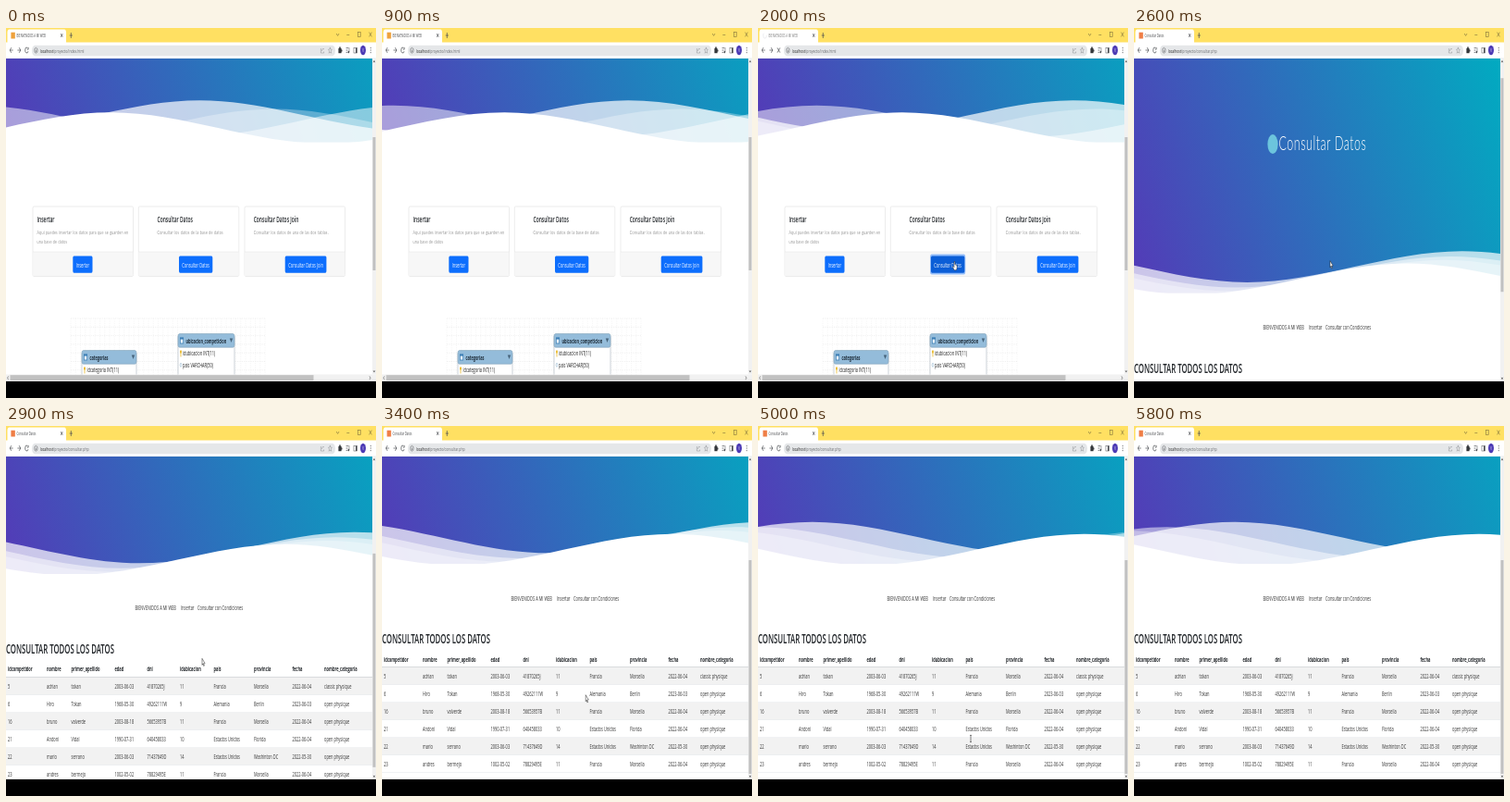
Write an HTML page with a canvas that moves like this. It is 400x400 px and loops after 5.9 s.

```html
<!DOCTYPE html>
<html lang="es">
<head>
<meta charset="utf-8">
<title>Consultar Datos</title>
<style>
html, body { margin: 0; width: 100%; height: 100%; overflow: hidden; background: #000; }
canvas { display: block; width: 400px; height: 400px; }
</style>
</head>
<body>
<canvas id="stage"></canvas>
<script>
const canvas = document.getElementById('stage');
const ctx = canvas.getContext('2d');
const dpr = window.devicePixelRatio || 1;
canvas.width = canvas.height = 400 * dpr;

// A 1536 x 864 desktop squeezed into the square stage
const SX = 400 / 1536, SY = 400 / 864;
const LOOP = 5900, SWITCH = 2300, LOADING = 1900;
const PAGE_W = 396, PAGE_TOP = 33, PAGE_END = 382;
const SANS = '"Open Sans", "Noto Sans", sans-serif';
const LATO = 'Lato, "Open Sans", sans-serif';

function rect(x, y, w, h, color) {
  ctx.fillStyle = color;
  ctx.fillRect(x, y, w, h);
}

function round(x, y, w, h, rx, ry, fill, stroke) {
  ctx.beginPath();
  ctx.roundRect(x, y, w, h, { x: rx, y: ry });
  if (fill) { ctx.fillStyle = fill; ctx.fill(); }
  if (stroke) { ctx.strokeStyle = stroke; ctx.lineWidth = 0.6; ctx.stroke(); }
}

function oval(x, y, rx, ry, color) {
  ctx.beginPath();
  ctx.ellipse(x, y, rx, ry, 0, 0, Math.PI * 2);
  ctx.fillStyle = color;
  ctx.fill();
}

function line(points, color, width = 0.7) {
  ctx.beginPath();
  for (let i = 0; i < points.length; i += 2) ctx.lineTo(points[i], points[i + 1]);
  ctx.strokeStyle = color;
  ctx.lineWidth = width;
  ctx.stroke();
}

// y is the middle of the capitals, size is in desktop pixels
function text(str, x, y, size, color = '#212529', o = {}) {
  const px = o.font ? size : size * 0.95;
  ctx.save();
  ctx.translate(x, y + size * 0.35 * SY);
  ctx.scale(SX, SY);
  ctx.font = `${o.weight || 400} ${px}px ${o.font || SANS}`;
  ctx.letterSpacing = (o.space || 0) + 'px';
  ctx.textAlign = o.align || 'left';
  ctx.fillStyle = color;
  ctx.fillText(str, 0, 0);
  ctx.restore();
}

function track(keys, t) {
  if (t <= keys[0][0]) return keys[0].slice(1);
  for (let i = 1; i < keys.length; i++) {
    const [a, b] = [keys[i - 1], keys[i]];
    if (t < b[0]) {
      const k = (t - a[0]) / (b[0] - a[0]);
      return a.slice(1).map((v, j) => v + (b[j + 1] - v) * k);
    }
  }
  return keys[keys.length - 1].slice(1);
}

// cubic-bezier(.55, .5, .45, .5)
function ease(x) {
  const bez = (s, a, b) => 3 * (1 - s) * (1 - s) * s * a + 3 * (1 - s) * s * s * b + s * s * s;
  let lo = 0, hi = 1;
  for (let i = 0; i < 24; i++) {
    const mid = (lo + hi) / 2;
    if (bez(mid, 0.55, 0.45) < x) lo = mid; else hi = mid;
  }
  return bez(lo, 0.5, 0.5);
}

const wave = new Path2D('M-160 44c30 0 58-18 88-18s58 18 88 18 58-18 88-18 58 18 88 18v44h-352z');
const layers = [
  { y: 0, alpha: 0.7, delay: 2, period: 7 },
  { y: 3, alpha: 0.5, delay: 3, period: 10 },
  { y: 5, alpha: 0.3, delay: 4, period: 13 },
  { y: 7, alpha: 1, delay: 5, period: 20 }
];

// top is where the wave strip begins, age the seconds since page load
function hero(top, age) {
  const w = PAGE_W / SX, inner = 490, strip = 113, h = inner + strip - 7;
  ctx.save();
  ctx.translate(0, top);
  ctx.scale(SX, SY);
  const half = (w * Math.sin(Math.PI / 3) + h * 0.5) / 2;
  const dx = half * Math.sin(Math.PI / 3), dy = half * 0.5;
  const cx = w / 2, cy = h / 2 - inner;
  const grad = ctx.createLinearGradient(cx - dx, cy + dy, cx + dx, cy - dy);
  grad.addColorStop(0, 'rgb(84,58,183)');
  grad.addColorStop(1, 'rgb(0,172,193)');
  ctx.fillStyle = grad;
  ctx.fillRect(0, -inner, w, h);
  ctx.beginPath();
  ctx.rect(0, 0, w, strip);
  ctx.clip();
  ctx.scale(w / 150, strip / 28);
  ctx.translate(0, -24);
  for (const l of layers) {
    const shift = -90 + 175 * ease(((age + l.delay) / l.period) % 1);
    ctx.save();
    ctx.translate(48 + shift, l.y);
    ctx.fillStyle = `rgba(255,255,255,${l.alpha})`;
    ctx.fill(wave);
    ctx.restore();
  }
  ctx.restore();
}

function card(x, title, tx, lines, label, bx, bw, state) {
  round(x, 193, 108.5, 75.5, 1, 1.9, '#fff', '#dfdfdf');
  rect(x + 0.3, 242, 107.9, 26, '#f7f7f7');
  line([x, 242, x + 108.5, 242], '#e2e2e2', 0.5);
  text(title, tx, 207, 20, '#212529', { weight: 600 });
  lines.forEach((s, i) => text(s, tx, 220.5 + i * 9.8, 14, '#444', { font: LATO, weight: 300, space: 1 }));
  if (state > 1) round(bx - 1, 244.6, bw + 2, 22, 2, 3.6, 'rgba(49,132,253,.5)');
  round(bx, 246.4, bw, 18.4, 1.2, 2, state ? '#0b5ed7' : '#0d6efd');
  text(label, bx + bw / 2, 256, 16, '#fff', { align: 'center' });
}

function entity(x, y, w, name) {
  rect(x, y + 3, w, 60, '#fff');
  line([x, 400, x, y + 3], '#a9b4bd', 0.6);
  line([x + w, 400, x + w, y + 3], '#a9b4bd', 0.6);
  round(x, y, w, 14.6, 1.6, 2.6, '#94bcda', '#7f9fb8');
  rect(x + 2, y + 3.8, 4, 7, '#3d7fb5');
  rect(x + 2.7, y + 6, 2.6, 4, '#e8f2fa');
  text(name, x + 8.5, y + 7.6, 15.5, '#1d2b38', { weight: 700 });
  ctx.beginPath();
  ctx.moveTo(x + w - 5.2, y + 5);
  ctx.lineTo(x + w - 1.8, y + 5);
  ctx.lineTo(x + w - 3.5, y + 9.5);
  ctx.fillStyle = '#46637a';
  ctx.fill();
}

function keyMark(x, y) {
  oval(x, y - 2, 1, 1.8, '#e8b92c');
  rect(x - 0.4, y - 1, 0.8, 4.5, '#e8b92c');
}

function diagram() {
  ctx.save();
  ctx.setLineDash([1.2, 1.2]);
  for (let x = 70; x <= 280; x += 5.25) line([x, 314, x, 375], '#ececec', 0.5);
  for (let y = 314; y < 375; y += 9.3) line([70, y, 280, y], '#e6e6e6', 0.6);
  ctx.restore();
  entity(82, 348.6, 59, 'categorias');
  keyMark(85, 370);
  text('idcategoria INT(11)', 87.5, 369.8, 16, '#222');
  entity(186, 330.6, 61, 'ubicacion_competicion');
  keyMark(189, 352);
  text('idubicacion INT(11)', 191, 351.8, 16, '#222');
  line([189, 362, 190, 364.3, 189, 366.5, 188, 364.3, 189, 362], '#8fb3cc', 0.5);
  text('pais VARCHAR(50)', 191, 364.2, 16, '#222');
}

function scrollbar(y, len, end) {
  rect(PAGE_W, PAGE_TOP, 4, end - PAGE_TOP, '#f1f1f1');
  rect(396.5, y, 3, len, '#c1c1c1');
  line([397.2, 37.2, 398, 35.4, 398.8, 37.2], '#505050', 0.7);
  line([397.2, end - 4.2, 398, end - 2.4, 398.8, end - 4.2], '#505050', 0.7);
}

function indexPage(t) {
  hero(74.5, 12.75 + t / 1000);
  card(29, 'Insertar', 33.5,
    ['Aquí puedes insertar los datos para que se guarden en', 'una base de datos'],
    'Insertar', 72.3, 21.2, 0);
  card(143.3, 'Consultar Datos', 163.5, ['Consultar los datos de la base de datos'],
    'Consultar Datos', 187, 36.3, t < 1650 ? 0 : t < LOADING ? 1 : 2);
  card(258, 'Consultar Datos Join', 267.7, ['Consultar los datos de una de las dos tablas.'],
    'Consultar Datos Join', 301.7, 44.7, 0);
  diagram();
  rect(0, 374.5, 400, 7.5, '#f1f1f1');
  rect(4.5, 375.2, 328, 6, '#c1c1c1');
  line([2.6, 376.5, 1.6, 378.3, 2.6, 380], '#505050', 0.6);
  line([393, 376.5, 394, 378.3, 393, 380], '#505050', 0.6);
  scrollbar(118, 144, 374.5);
}

const colX = [2, 44, 70.5, 117.5, 152.5, 188, 224.5, 268, 309.5, 344];
const head = 'idcompetidor,nombre,primer_apellido,edad,dni,idubicacion,pais,provincia,fecha,nombre_categoria'.split(',');
const rows = [
  '5,adrian,tokan,2003-06-03,XXXXXXXXJ,11,Francia,Marsella,2022-06-04,classic physique',
  '6,Hiro,Tokan,1968-05-30,XXXXXXXXW,9,Alemania,Berlin,2023-06-03,open physique',
  '16,bruno,valverde,2003-08-18,XXXXXXXXB,11,Francia,Marsella,2022-06-04,open physique',
  '21,Andoni,Vidal,1990-07-31,XXXXXXXXX,10,Estados Unidos,Florida,2022-06-04,open physique',
  '22,mario,serrano,2003-06-03,XXXXXXXXD,14,Estados Unidos,Washinton DC,2022-05-30,open physique',
  '23,andres,bermejo,1002-05-02,XXXXXXXXE,11,Francia,Marsella,2022-06-04,open physique'
].map((r, i) => r.replace(/X+/, s => String(41870265 + i * 7391846).padEnd(s.length, '3').slice(0, s.length)).split(','));

const scrollKeys = [[2450, 0], [2600, 21], [2900, 148], [3000, 159]];

function dataPage(t) {
  const [scroll] = track(scrollKeys, t);
  const top = 259 - scroll;
  hero(top, (t - 1650) / 1000);
  oval(150, top - 112, 5.6, 10.5, '#6cc5dd');
  text('Consultar Datos', 156.5, top - 113, 48, '#fff', { font: LATO, weight: 300, space: 2 });
  text('BIENVENIDOS A MI WEB', 139.5, top + 86, 16, '#333');
  text('Insertar', 189, top + 86, 16, '#333');
  text('Consultar con Condiciones', 207, top + 86, 16, '#333');
  text('CONSULTAR TODOS LOS DATOS', 0, top + 130, 31.5, '#212529', { weight: 600 });
  head.forEach((s, i) => text(s, colX[i], top + 152, 16, '#212529', { weight: 700 }));
  rows.forEach((r, n) => {
    const y = top + 160.7 + n * 18.98;
    if (n % 2 === 0) rect(0, y, PAGE_W, 18.98, '#f2f2f2');
    rect(0, y + 18.6, PAGE_W, 0.46, '#dee2e6');
    r.forEach((s, i) => text(s, colX[i], y + 9.6, 16, '#333'));
  });
  rect(0, top + 160.4, PAGE_W, 0.6, '#c4c7ca');
  scrollbar(40.1 + 0.66 * scroll, 231, PAGE_END);
}

function browser(t) {
  const ink = '#4a4d51', faint = '#8a8d90', frame = '#8f8040';
  const data = t >= SWITCH, busy = t >= LOADING && !data;
  rect(0, 0, 400, 16, '#ffe062');
  rect(0, 15.5, 400, 17.5, '#fff');
  round(1.5, 1.5, 63.5, 18, 2, 3.7, '#fff');
  if (busy) {
    ctx.beginPath();
    const a = t / 160;
    ctx.ellipse(7.5, 8, 1.8, 3.2, 0, a, a + 4);
    ctx.strokeStyle = '#dfe1e4';
    ctx.lineWidth = 0.6;
    ctx.stroke();
  } else {
    rect(5.4, 4.7, 4.4, 6.8, data ? '#ef7d45' : '#eea13c');
  }
  text(data ? 'Consultar Datos' : 'BIENVENIDOS A MI WEB', 11.5, 8, 11.3, busy ? '#777' : '#45474a');
  line([59.2, 6.2, 61.2, 9.8], ink);
  line([61.2, 6.2, 59.2, 9.8], ink);
  line([68.7, 8, 72, 8], ink);
  line([70.3, 5, 70.3, 11], ink);
  line([357.2, 6, 358.6, 8.4, 360, 6], frame);
  line([368.3, 7.5, 371.3, 7.5], frame);
  ctx.strokeRect(380.6, 4.6, 2.6, 4.8);
  line([392.6, 4.6, 395.4, 9.4], frame);
  line([395.4, 4.6, 392.6, 9.4], frame);

  line([7.6, 24, 4.2, 24], ink);
  line([5.8, 21.2, 4.2, 24, 5.8, 26.8], ink);
  line([12.4, 24, 15.8, 24], ink);
  line([14.2, 21.2, 15.8, 24, 14.2, 26.8], ink);
  if (busy) {
    line([21, 21.4, 23.8, 26.6], ink);
    line([23.8, 21.4, 21, 26.6], ink);
  } else {
    ctx.beginPath();
    ctx.ellipse(22.4, 24, 1.7, 3, 0, 0.4, 5.4);
    ctx.stroke();
    line([24.1, 20.8, 24.1, 23.2, 22.8, 23.2], ink);
  }
  round(28, 18.7, 328, 11.6, 3.2, 5.8, '#e5e7e9');
  ctx.beginPath();
  ctx.ellipse(32.4, 24.2, 1.6, 2.9, 0, 0, Math.PI * 2);
  ctx.strokeStyle = ink;
  ctx.lineWidth = 0.5;
  ctx.stroke();
  line([32.4, 23.8, 32.4, 26], ink, 0.5);
  const urlSize = 13.8;
  text('localhost', 36.8, 24.4, urlSize, '#222');
  ctx.font = `400 ${urlSize * 0.95}px ${SANS}`;
  const host = ctx.measureText('localhost').width * SX;
  text(data ? '/proyecto/consultar.php' : '/proyecto/index.html', 36.8 + host, 24.4, urlSize, '#66696d');

  line([341, 22.5, 340.4, 22.5, 340.4, 27, 343.6, 27, 343.6, 25.5], faint, 0.5);
  line([341.4, 25, 342.2, 22.6, 344, 22.6], faint, 0.5);
  ctx.beginPath();
  for (let i = 0; i <= 10; i++) {
    const a = i * Math.PI / 5 - Math.PI / 2, r = i % 2 ? 0.45 : 1;
    ctx.lineTo(350.4 + Math.cos(a) * 2 * r, 24.4 + Math.sin(a) * 3.5 * r);
  }
  ctx.stroke();
  rect(359.4, 22, 3.2, 5.2, '#34373a');
  oval(361, 21.6, 0.8, 1.3, '#34373a');
  oval(362.8, 24.5, 0.7, 1.2, '#34373a');
  for (let i = 0; i < 3; i++) line([367.6, 21.6 + i * 2.4, 370.4 - (i ? 1 : 0), 21.6 + i * 2.4], ink, 0.7);
  line([371, 21.2, 371, 26], ink, 0.5);
  oval(370.4, 26, 0.8, 1.2, ink);
  ctx.strokeStyle = ink;
  ctx.strokeRect(376, 21.4, 3.4, 5.6);
  rect(378, 21.4, 1.4, 5.6, ink);
  oval(386, 24, 3, 5.2, '#4d3bb5');
  text('V', 386, 24.2, 11, '#fff', { align: 'center' });
  for (let i = -1; i < 2; i++) oval(394.2, 24 + i * 2.5, 0.45, 0.8, ink);
  rect(0, 32.6, 400, 0.4, '#e3e5e7');
}

const cursorKeys = [
  [1050, 290, 392], [1650, 212, 253], [3150, 212, 251], [3700, 230, 338]
];

function cursor(t) {
  if (t < 1050 || t > 5200) return;
  const [x, y] = track(cursorKeys, t);
  ctx.save();
  ctx.translate(x, y);
  if (t >= 3500) {
    line([-1, -3.6, 1, -3.6], '#333', 0.6);
    line([0, -3.6, 0, 3.6], '#333', 0.6);
    line([-1, 3.6, 1, 3.6], '#333', 0.6);
  } else {
    const hand = t >= 1650 && t < SWITCH;
    const shape = new Path2D(hand
      ? 'M0 0h.9v3.2l2.2.8v3.2l-.7 2h-2.3l-1.5-3.2.5-.8.9.9z'
      : 'M0 0v7l.9-1.4.8 2.6.7-.4-.8-2.5h1.5z');
    ctx.fillStyle = '#fff';
    ctx.strokeStyle = '#222';
    ctx.lineWidth = 0.5;
    ctx.fill(shape);
    ctx.stroke(shape);
  }
  ctx.restore();
}

function draw(t) {
  ctx.setTransform(dpr, 0, 0, dpr, 0, 0);
  rect(0, 0, 400, 400, '#fff');
  if (t < SWITCH) indexPage(t); else dataPage(t);
  browser(t);
  rect(0, PAGE_END, 400, 18, '#000');
  cursor(t);
}

const start = performance.now();
function tick() {
  draw((performance.now() - start) % LOOP);
  requestAnimationFrame(tick);
}
draw(0);
requestAnimationFrame(tick);
</script>
</body>
</html>
```
